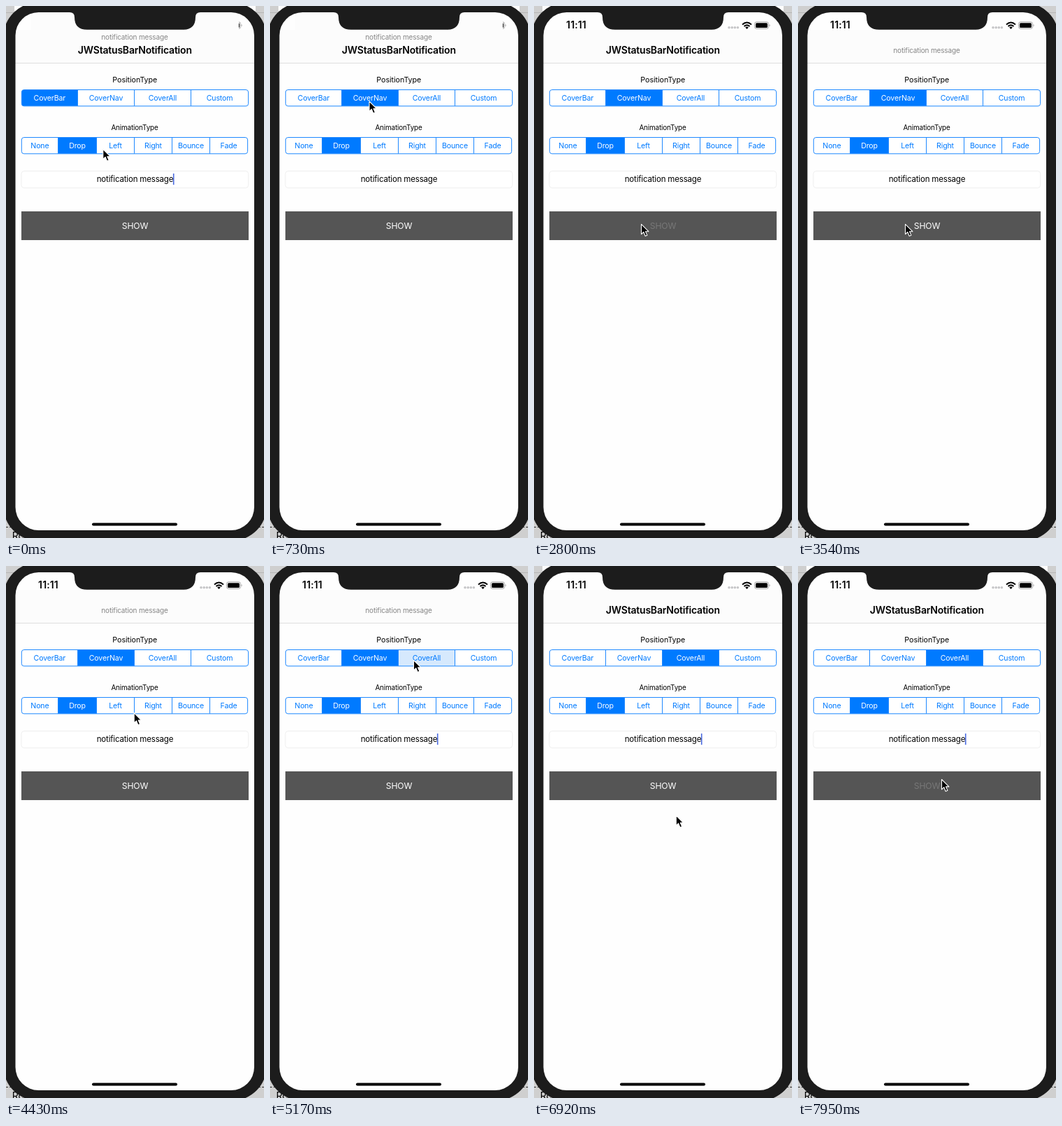
These frames come from a looping animation (369x759 px, 8 s). An HTML page:

```html
<!DOCTYPE html>
<html lang="en">
<head>
<meta charset="utf-8">
<title>Status bar notification demo</title>
<style>
html, body { margin: 0; width: 100%; height: 100%; overflow: hidden; background: #cfcfcf; }
svg { display: block; width: 369px; height: 759px; }
text { font-family: Inter, Roboto, sans-serif; letter-spacing: -.015em; text-anchor: middle; fill: #000; }
.bold { font-weight: 600; }
.clock { font-weight: 600; letter-spacing: .01em; }
.note { font-size: 10px; fill: #858585; }
</style>
</head>
<body>
<svg viewBox="0 0 369 759">
  <rect width="369" height="759" fill="#cfcfcf"/>
  <path d="M0 9.5H26M343 9.5H369" stroke="#b5b5b5"/>
  <path d="M0 743.5H8M361 743.5H369" stroke="#333" stroke-dasharray="3 2"/>
  <text x="17" y="761" font-size="14">Rc</text>

  <rect x="10" y="6" width="348" height="745" rx="36" fill="#fefefe"/>
  <rect x="12" y="34" width="345" height="47" fill="#fcfcfc"/>
  <path d="M12 81.5H357" stroke="#dedede"/>
  <text x="184.3" y="68.2" font-size="14" class="bold">JWStatusBarNotification</text>

  <text x="60.5" y="32.3" font-size="14" class="clock">11:11</text>
  <g fill="#c6c6c8">
    <circle cx="279" cy="30.7" r="1.8"/><circle cx="283.2" cy="30.7" r="1.8"/>
    <circle cx="287.3" cy="30.7" r="1.8"/><circle cx="291.4" cy="30.7" r="1.8"/>
  </g>
  <path d="M298 26.4Q304.5 20.6 311 26.4M300.5 29Q304.5 25.4 308.5 29" fill="none" stroke="#000" stroke-width="2"/>
  <path d="M302.2 30.5Q304.5 28.5 306.8 30.5L304.5 32.9Z"/>
  <rect x="315.5" y="22.8" width="20" height="9.6" rx="2.7" fill="none" stroke="#a3a3a3"/>
  <rect x="317" y="24.3" width="17" height="6.6" rx="1.5"/>
  <path d="M336.6 26Q338.6 27.6 336.6 29.4Z" fill="#a3a3a3"/>

  <g id="barNote">
    <rect x="36" y="10" width="297" height="42" fill="#fcfcfc"/>
    <text x="184" y="47.8" class="note">notification message</text>
  </g>
  <g id="navNote">
    <rect x="12" y="42" width="345" height="39" fill="#fcfcfc"/>
    <text x="184" y="67.2" class="note">notification message</text>
  </g>

  <text x="184.3" y="108.5" font-size="10.7" style="letter-spacing:-.005em">PositionType</text>
  <g id="position"></g>
  <text x="184" y="176.5" font-size="9.9">AnimationType</text>
  <g id="animation"></g>

  <rect x="22" y="235.5" width="324.7" height="24" rx="4" fill="#fff" stroke="#efefef"/>
  <text x="184.5" y="251.1" font-size="11.5">notification message</text>
  <rect id="caret" x="238.9" y="239" width="1.6" height="16" fill="#4a6ae0"/>

  <rect x="22" y="293" width="325" height="41" fill="#555"/>
  <text id="show" x="184.5" y="318" font-size="12.2" style="fill:#fff">SHOW</text>
  <rect x="123" y="737.4" width="122" height="4" rx="2"/>

  <path id="bezel" fill="#1c1c1c" fill-rule="evenodd"/>
  <path d="M91 8V9Q98 9 98 16Q98 33.8 116 33.8H253Q271 33.8 271 16Q271 9 278 9V8Z" fill="#1c1c1c"/>
  <path id="cursor" d="M0 0V14.3L3.3 11.2L5.7 17L8.4 15.8L6 10.4H10.4Z" stroke="#fff" stroke-width="1.1" stroke-linejoin="round"/>
</svg>
<script>
const NS = "http://www.w3.org/2000/svg";
const $ = id => document.getElementById(id);
const LOOP = 8000, TICK = 147.3;

function add(parent, tag, attrs, label = "") {
  const el = document.createElementNS(NS, tag);
  for (const key in attrs) el.setAttribute(key, attrs[key]);
  el.textContent = label;
  return parent.appendChild(el);
}

// Outline of a rounded rectangle.
function rounded(x, y, w, h, r) {
  const arc = (dx, dy) => `a${r} ${r} 0 0 1 ${dx} ${dy}`;
  return `M${x + r} ${y}h${w - 2 * r}${arc(r, r)}v${h - 2 * r}${arc(-r, r)}` +
    `h${2 * r - w}${arc(-r, -r)}v${2 * r - h}${arc(r, -r)}z`;
}
$("bezel").setAttribute("d", rounded(-4, -5, 377, 768, 50) + rounded(13.5, 9, 341.5, 739, 33));

// Builds a segmented control; returns a function that sets its state.
function segments(id, top, edges, labels) {
  const g = $(id), height = 23.3, line = "#1f89ff";
  const left = edges[0], width = edges[labels.length] - left;
  const box = { x: left, y: top, width, height, rx: 3.5 };
  const clip = add(g, "clipPath", { id: id + "Clip" });
  add(clip, "rect", box);
  const inner = add(g, "g", { "clip-path": `url(#${id}Clip)` });
  const cells = labels.map((label, i) => {
    const x = edges[i], w = edges[i + 1] - x;
    const fill = add(inner, "rect", { x, y: top, width: w, height });
    const text = add(g, "text", { x: x + w / 2, y: top + 15.6, "font-size": 10.6 }, label);
    return { fill, text };
  });
  for (const x of edges.slice(1, -1)) add(inner, "path", { d: `M${x} ${top}v${height}`, stroke: line });
  add(g, "rect", { ...box, fill: "none", stroke: line });
  return (selected, pressed) => cells.forEach(({ fill, text }, i) => {
    fill.setAttribute("fill", i === selected ? "#007aff" : i === pressed ? "#d6e9fd" : "#fff");
    text.style.fill = i === selected ? "#fff" : "#007aff";
  });
}

const setPosition = segments("position", 119.5, [22.3, 102.5, 183.5, 264.5, 346.6],
  ["CoverBar", "CoverNav", "CoverAll", "Custom"]);
const setAnimation = segments("animation", 187.5, [22.3, 74.5, 129.5, 183.5, 237.5, 291.5, 345.6],
  ["None", "Drop", "Left", "Right", "Bounce", "Fade"]);
setAnimation(1);

// Pointer path: [tick, x, y]
const path = [
  [0, 138.8, 204.3], [1, 140, 190], [3, 142, 136], [6, 142, 136], [8, 142.5, 228],
  [9, 142.7, 246.5], [12, 152, 321], [16, 153.3, 318], [17, 153.5, 311.3], [27, 153.5, 311.3],
  [32, 203, 142], [33, 205.5, 134.5], [37, 205.5, 134.5], [41, 190.7, 347.5],
  [43, 198, 390], [45, 201, 388], [49, 205.5, 324], [51, 205.5, 304.5]
];

const clamp = v => Math.max(0, Math.min(1, v));
const ease = v => { v = clamp(v); return v * v * (3 - 2 * v); };
const within = (n, a, b) => n >= a && n < b;

function pointer(n) {
  const i = path.findIndex(p => p[0] > n);
  if (i < 0) return path[path.length - 1].slice(1);
  const [t0, x0, y0] = path[i - 1], [t1, x1, y1] = path[i];
  const k = (n - t0) / (t1 - t0);
  return [x0 + (x1 - x0) * k, y0 + (y1 - y0) * k];
}

const shift = (id, y) => $(id).setAttribute("transform", `translate(0 ${y})`);

function draw(ms) {
  // The screen refreshes at a steady, low rate.
  const n = Math.floor((ms + 12) / 147.4);
  const sec = n * TICK / 1000;

  $("cursor").setAttribute("transform", `translate(${pointer(n)})`);
  setPosition(n < 5 ? 0 : n < 36 ? 1 : 2, n === 4 ? 1 : within(n, 34, 36) ? 2 : -1);

  shift("barNote", -46 * ease((n - 10) / 3));
  const shown = ease((n - 20) / 3) - ease((n - 43) / 3);
  shift("navNote", -74 * (1 - shown));

  $("caret").style.opacity = (sec + .19) % 1 < .55 ? 1 : 0;
  $("show").style.opacity = within(n, 18, 20) || n >= 53 ? .2 : 1;
}

const start = performance.now();
function loop() {
  draw((performance.now() - start) % LOOP);
  requestAnimationFrame(loop);
}
draw(0);
requestAnimationFrame(loop);
</script>
</body>
</html>
```
